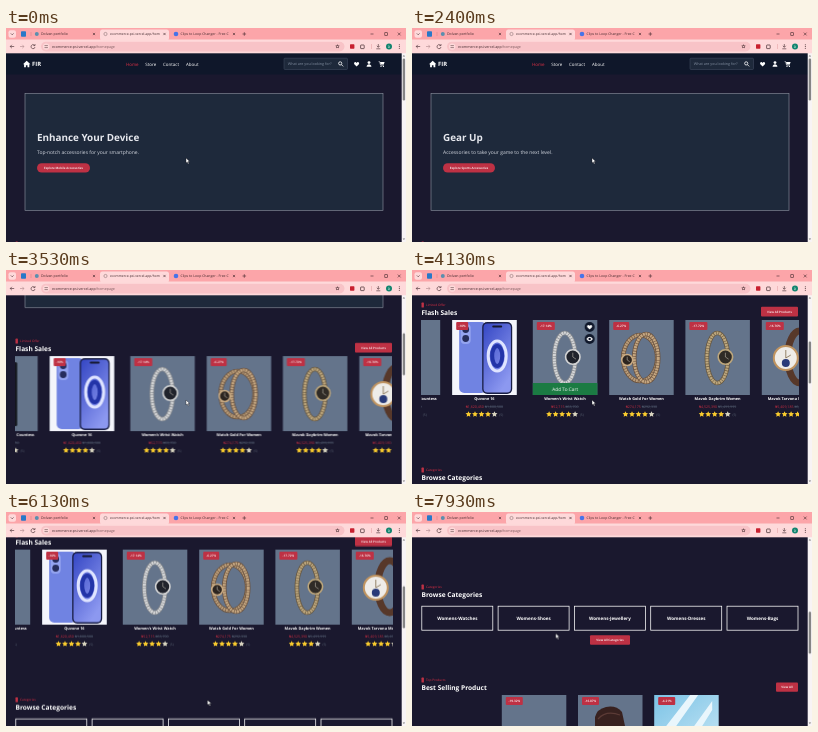
Recreate the animation shown at these times as an HTML page. Size 400 px wide and 214 px high, loop 8 s.

```html
<!DOCTYPE html>
<html lang="en">
<head>
<meta charset="utf-8">
<title>Shop homepage</title>
<style>
  html, body { margin: 0; width: 100%; height: 100%; overflow: hidden; background: #1a182e; }
  svg { display: block; width: 100%; height: 100%; }
  text { font-family: "Open Sans", "Noto Sans", sans-serif; text-rendering: geometricPrecision; white-space: pre; }
</style>
</head>
<body>
<svg id="stage" viewBox="0 0 400 214"></svg>
<script>
const LOOP = 8000;
const RED = '#be3144', SLATE = '#64748b', NAVY = '#0f172a', PANEL = '#1e293b', INK = '#40282c';

const rect = (x, y, w, h, fill, r = 0, more = '') =>
  `<rect x="${x}" y="${y}" width="${w}" height="${h}" rx="${r}" fill="${fill}" ${more}/>`;
const circle = (x, y, r, fill, more = '') =>
  `<circle cx="${x}" cy="${y}" r="${r}" fill="${fill}" ${more}/>`;
const oval = (x, y, rx, ry, stroke, width, more = '') =>
  `<ellipse cx="${x}" cy="${y}" rx="${rx}" ry="${ry}" fill="none" stroke="${stroke}" stroke-width="${width}" ${more}/>`;
const line = (d, stroke, width = .6, fill = 'none') =>
  `<path d="${d}" fill="${fill}" stroke="${stroke}" stroke-width="${width}"/>`;
const shape = (d, fill) => `<path d="${d}" fill="${fill}"/>`;
const text = (x, y, s, size, fill = '#fff', weight = 400, anchor = 'start') =>
  `<text x="${x}" y="${y}" font-size="${size}" fill="${fill}" font-weight="${weight}" text-anchor="${anchor}">${s}</text>`;
const at = (x, y, content) => `<g transform="translate(${x} ${y})">${content}</g>`;
const clip = (id, content) => `<g clip-path="url(#${id})">${content}</g>`;
const button = (x, y, w, h, label, size, r = 1) =>
  rect(x, y, w, h, RED, r) + text(x + w / 2, y + h / 2 + size * .36, label, size, '#fff', 600, 'middle');

const star = (x, y, r, fill) => {
  const points = Array.from({ length: 10 }, (_, i) => {
    const a = Math.PI * (i / 5 - .5), d = i % 2 ? r * .48 : r;
    return `${(x + d * Math.cos(a)).toFixed(2)},${(y + d * Math.sin(a)).toFixed(2)}`;
  });
  return `<polygon points="${points.join(' ')}" fill="${fill}"/>`;
};
const heart = (x, y, fill) =>
  at(x, y, shape('M0 2.3L-2.3 0C-3.4-1.7-1-3.2 0-1.3C1-3.2 3.4-1.7 2.3 0Z', fill));
const cross = (x, y, s = 1.1) =>
  line(`M${x - s} ${y - s}l${2 * s} ${2 * s}m0 ${-2 * s}l${-2 * s} ${2 * s}`, INK, .6);

function browser() {
  return rect(0, 0, 400, 12.5, '#fca5a9') + rect(0, 11.5, 400, 13.8, '#fed9da') +
    rect(2.5, 2.2, 7.5, 7.5, '#fed9da', 2) + line('M4.8 5.4l1.4 1.4l1.4-1.4', INK) +
    rect(15, 3.2, 5, 5.6, '#2878c8', .8) + line('M25 4v4', '#c9777c', .4) +
    circle(30.8, 6, 2, '#5b8fae') + text(35, 7.4, 'Dolvan portfolio', 3.55, INK) + cross(88, 6) +
    rect(94, 1.5, 69, 11, '#fed9da', 2.5) + circle(99.5, 6, 1.6, 'none', 'stroke="#7b6265" stroke-width=".5"') +
    text(104, 7.4, 'ecommerce-psi.vercel.app/hom', 3.4, INK) + cross(158.5, 6) +
    circle(170, 6, 2.3, '#4773e8') + text(174.5, 7.4, 'Clips to Loop Changer - Free C', 3.45, INK) + cross(228, 6) +
    line('M236.5 6h3.6m-1.8-1.8v3.6', INK) +
    line('M364.5 6h3', INK) + rect(378.8, 4.7, 2.6, 2.6, 'none', 0, `stroke="${INK}" stroke-width=".6"`) + cross(393.2, 6, 1.4) +
    line('M8.2 18.5h-4m1.7-1.7l-1.7 1.7l1.7 1.7', INK) +
    line('M14 18.5h4m-1.7-1.7l1.7 1.7l-1.7 1.7', '#b08a8e') +
    line('M28.5 17.3A2 2 0 1 0 29 19M29 16v1.6h-1.6', INK) +
    rect(35, 13.8, 303.5, 9.6, '#f8c3c7', 4.8) + circle(40.2, 18.6, 3.2, '#fed9da') +
    line('M38.5 17.6h3.4m-3.4 2h3.4', INK, .5) +
    text(46, 19.9, 'ecommerce-psi.vercel.app<tspan fill="#7c5a5e">/homepage</tspan>', 3.58, INK) +
    star(331.5, 18.5, 2.3, INK) + star(331.5, 18.5, 1.3, '#f8c3c7') +
    rect(344, 16.3, 4.4, 4.4, '#c8202f', .6) +
    rect(354.6, 17, 3.6, 3.6, 'none', .5, `stroke="${INK}" stroke-width=".7"`) + line('M365.5 16v5', '#e29a9f', .5) +
    line('M372.3 16v3.2m-1.5-1.4l1.5 1.5l1.5-1.5m-3.5 3h4', INK) +
    circle(383, 18.6, 3, '#12856f') + text(383, 19.8, 'D', 3.2, '#fff', 400, 'middle') +
    [16.7, 18.5, 20.3].map(y => circle(393.3, y, .5, INK)).join('');
}

function nav() {
  const links = [[120, 'Home', '#dc2f45'], [139.3, 'Store'], [157, 'Contact'], [180, 'About']];
  return rect(0, 25, 396, 21.5, NAVY) +
    shape('M17 36.2l3.7-3.4l3.7 3.4h-1.1v3h-1.8v-2h-1.6v2h-1.8v-3z', '#fff') +
    text(26, 38.2, 'FIR', 5.9, '#fff', 700) +
    links.map(([x, s, c]) => text(x, 37.8, s, 4.46, c)).join('') +
    rect(278, 30.2, 63.5, 11.3, PANEL, 1, 'stroke="#475166" stroke-width=".5"') +
    text(281.8, 37.2, 'What are you looking for?', 3.7, '#8490a2') +
    oval(334.2, 35.4, 1.6, 1.6, '#fff', .8) + line('M335.4 36.6l1.8 1.8', '#fff', .8) +
    heart(350.6, 36.2, '#fff') +
    circle(363, 34.6, 1.4, '#fff') + shape('M360.6 38.8c0-3.4 4.8-3.4 4.8 0z', '#fff') +
    line('M372.6 33.6h1l1 3.6h3.2', '#fff', .6) + shape('M374 34.1h4.6l-.8 2.4h-3.2z', '#fff') +
    circle(375, 38.4, .6, '#fff') + circle(377.4, 38.4, .6, '#fff');
}

const slide = (x, title, line2, label, w) => at(x, 0,
  text(31, 113.4, title, 9.9, '#e6e8ee', 700) + text(31, 125.6, line2, 4.98, '#d4d8e0') +
  button(31, 135.2, w, 9.4, label, 3, 4.7));

const hero = () =>
  rect(19, 65.5, 358, 117, PANEL) +
  clip('heroClip', '<g id="slides">' +
    slide(0, 'Enhance Your Device', 'Top-notch accessories for your smartphone.', 'Explore Mobile Accessories', 53) +
    slide(358, 'Gear Up', 'Accessories to take your game to the next level.', 'Explore Sports Accessories', 52) + '</g>') +
  rect(19, 65.5, 358, 117, 'none', 0, 'stroke="#8f97a3" stroke-width=".6"');

const heading = (y, label, title) =>
  rect(9.5, y - 12.4, 2.4, 5, RED, .6) + text(14, y - 8.7, label, 3.2, '#dc2f45') + text(9.5, y, title, 6.6, '#fff', 700);

const band = (x, y, rx, ry, dark, light) =>
  oval(x, y, rx, ry, dark, 4.6) + oval(x, y, rx, ry, light, 3, 'stroke-dasharray="2 .6"');
const dial = (x, y, r, rim, face) =>
  circle(x, y, r, face, `stroke="${rim}" stroke-width="1.6"`) +
  line(`M${x} ${y - r * .6}V${y}l${r * .45} ${r * .3}`, '#d8d2c4', .5);
const watch = (dark, light, face) => band(32, 38, 10.5, 25, dark, light) + dial(40, 37, 7.2, light, face);

const art = {
  tube: rect(39, 6, 5, 64, '#14161d', 1.5) + rect(24, 22, 7, 48, '#23252e', 1),
  phone: rect(0, 0, 64.5, 75, '#f4f5fb') + rect(7, 2, 27, 71, '#7083e2', 5) +
    rect(8.5, 4, 10, 20, '#94a4f0', 4) + circle(13.5, 9.5, 3.4, '#262d5c') + circle(13.5, 18.5, 3.4, '#262d5c') +
    rect(30, 2, 30, 72, '#181d44', 5) + rect(31.3, 3.4, 27.4, 69.2, 'url(#screen)', 4) +
    oval(45, 36, 9, 15, '#dfe4ff', 3) + oval(45, 36, 5, 10, '#2334a8', 4) + rect(40, 5.4, 10, 2.2, '#15182f', 1.1),
  silver: watch('#85898f', '#d3d4d5', '#20232c'),
  rose: band(31, 38, 17, 23, '#6b5340', '#b99c78') + band(37, 38, 12, 24, '#6b5340', '#c4a680') +
    dial(18, 40, 5.5, '#c9ab84', '#2b2420'),
  gold: watch('#675842', '#bca67c', '#2f2b26'),
  leather: oval(38, 37, 12, 26, '#57382a', 7) + circle(24, 38, 12, '#eeece8', 'stroke="#c09460" stroke-width="2"') +
    circle(24, 43, 4, '#293a78') + line('M24 30v8l5-3', '#6f5733', .7),
};

const badge = (s, w) => rect(4, 2, w, 8, RED, 1) + text(4 + w / 2, 7.2, s, 3.1, '#fff', 600, 'middle');

const hoverLayer = `<g id="hover">${rect(0, 63, 64.5, 12, '#1b7b43')}
  ${text(32.2, 70.8, 'Add To Cart', 4.8, '#fff', 400, 'middle')}
  ${circle(56.8, 7, 5, NAVY)}${heart(56.8, 7.2, '#fff')}
  ${circle(56.8, 19, 5, NAVY)}${shape('M53.6 19q3.2-4.4 6.4 0q-3.2 4.4-6.4 0z', '#fff')}${circle(56.8, 19, 1.2, NAVY)}</g>`;

const products = [
  { x: -36.3, name: 'Velvet Mascara Lash Countess', off: '-7.17%', now: '₦14,985', was: '₦16,150', art: 'tube' },
  { x: 40.2, name: 'Quvone 16', off: '-10%', now: '₦1,620,450', was: '₦1,800,500', art: 'phone' },
  { x: 120.8, name: "Women's Wrist Watch", off: '-17.14%', now: '₦52,715', was: '₦63,700', art: 'silver', hover: true },
  { x: 197.2, name: 'Watch Gold For Women', off: '-6.27%', now: '₦274,175', was: '₦292,330', art: 'rose' },
  { x: 273.4, name: 'Mavok Daybrim Women', off: '-17.72%', now: '₦4,525,390', was: '₦5,499,995', art: 'gold' },
  { x: 349.8, name: 'Mavok Tarvona Moonphase', off: '-16.76%', now: '₦5,409,185', was: '₦6,498,300', art: 'leather' },
];

const card = p => at(p.x, 231,
  rect(0, 0, 64.5, 75, SLATE) + art[p.art] + badge(p.off, 4 + p.off.length * 2) +
  (p.hover ? hoverLayer : '') +
  text(32.2, 80.4, p.name, 3.85, '#fff', 700, 'middle') +
  text(32.2, 87.6, `${p.now} <tspan fill="#566073" text-decoration="line-through">${p.was}</tspan>`, 3.6, '#c52d42', 400, 'middle') +
  [0, 1, 2, 3, 4].map(i => star(16.3 + i * 6.5, 94.3, 3.1, i < 4 ? '#facc2e' : '#d9d5c0')).join('') +
  text(47, 95.6, '(5)', 3.4, '#596273'));

const categories = ['Watches', 'Shoes', 'Jewellery', 'Dresses', 'Bags'];
const category = (name, i) => {
  const x = 9.8 + i * 76.3;
  return rect(x, 400.2, 71, 24, 'none', 0, 'stroke="#fff" stroke-width=".75"') +
    text(x + 35.5, 413.7, 'Womens-' + name, 4.56, '#fff', 700, 'middle');
};

const bestSellers = [
  ['-19.32%', SLATE, ''],
  ['-16.07%', SLATE, shape('M17 31V22q2-8 11-10q10-2 16 5l3 14z', '#38211f') + line('M20 24q8-9 22-4', '#5c3b36', 1.2)],
  ['-4.21%', 'url(#sky)', shape('M12 31L36 0h8L22 31zM40 31L58 6v9L48 31z', '#e9f6fc')],
];
const bestSeller = ([off, fill, content], i) => at(89.8 + i * 76.2, 489, rect(0, 0, 64.5, 75, fill) + content + badge(off, 17));

const page = () => nav() + hero() +
  heading(226, 'Limited Offer', 'Flash Sales') + button(349, 217.8, 37, 9.6, 'View All Products', 3) +
  clip('rowClip', `<g id="row">${products.map(card).join('')}</g>`) +
  heading(391, 'Categories', 'Browse Categories') + categories.map(category).join('') +
  button(178, 429.3, 40, 9.4, 'View All Categories', 3) +
  heading(484, 'Top Products', 'Best Selling Product') + button(364, 476.4, 22, 9.4, 'View All', 3) +
  bestSellers.map(bestSeller).join('');

const gradient = (id, a, b) => `<linearGradient id="${id}" x2=".6" y2="1">
  <stop stop-color="${a}"/><stop offset="1" stop-color="${b}"/></linearGradient>`;
const clipBox = (id, ...box) => `<clipPath id="${id}">${rect(...box, '#fff')}</clipPath>`;

document.getElementById('stage').innerHTML =
  `<defs>${gradient('screen', '#3547c4', '#8c98f0')}${gradient('sky', '#7cc3e6', '#c8e7f5')}
   ${clipBox('pageClip', 0, 25, 396, 189)}${clipBox('heroClip', 19, 65, 358, 118)}${clipBox('rowClip', 9.5, 225, 376.7, 120)}</defs>` +
  rect(0, 0, 400, 214, '#1a182e') + clip('pageClip', `<g id="page">${page()}</g>`) +
  rect(395.7, 25, 4.3, 189, '#f8f4f5') + shape('M396.7 28.6l1.2-1.6l1.2 1.6z', '#777') + shape('M396.7 210.4l1.2 1.6l1.2-1.6z', '#777') +
  `<g id="thumb">${rect(396.7, 30.5, 2.4, 42, '#858585', 1.2)}</g>` + browser() +
  `<g id="cursor">${line('M0 0v5l1.2-1.1l.9 2l.9-.4l-.9-1.9h1.6z', '#15151c', .4, '#fff')}</g>`;

// Each step is [time in ms, x, y, easing towards the next step].
function move(id, steps) {
  const [, endX, endY] = steps[steps.length - 1];
  const frames = [...steps, [LOOP, endX, endY]].map(([t, x, y, easing = 'linear']) =>
    ({ offset: t / LOOP, transform: `translate(${x}px, ${y}px)`, easing }));
  document.getElementById(id).animate(frames, { duration: LOOP, iterations: Infinity });
}

// Two swipes, each speeding up and then gliding to rest.
const scroll = [
  [0, 0], [2400, 0, 'ease-in'], [3130, 66, 'ease-out'], [3930, 181],
  [5800, 181, 'ease-in'], [6130, 193.3], [6930, 241, 'ease-out'], [7700, 306],
];
move('page', scroll.map(([t, y, easing]) => [t, 0, -y, easing]));
move('thumb', scroll.map(([t, y, easing]) => [t, 0, y * .226, easing]));
move('slides', [[0, 0, 0], [1900, 0, 0, 'ease'], [2400, -358, 0]]);
move('row', [[0, 34.4, 0], [3930, 0, 0], [5670, 0, 0], [7999, -20.4, 0]]);
move('cursor', [
  [0, 180, 130], [4600, 180, 130, 'ease-in-out'], [5200, 201.5, 188],
  [7350, 201.5, 188, 'ease-in-out'], [7850, 143.7, 121.5],
]);

document.getElementById('hover').animate(
  [[0, 0], [3850, 0], [3950, 1], [4750, 1], [4850, 0], [LOOP, 0]].map(([t, opacity]) => ({ offset: t / LOOP, opacity })),
  { duration: LOOP, iterations: Infinity });
</script>
</body>
</html>
```
